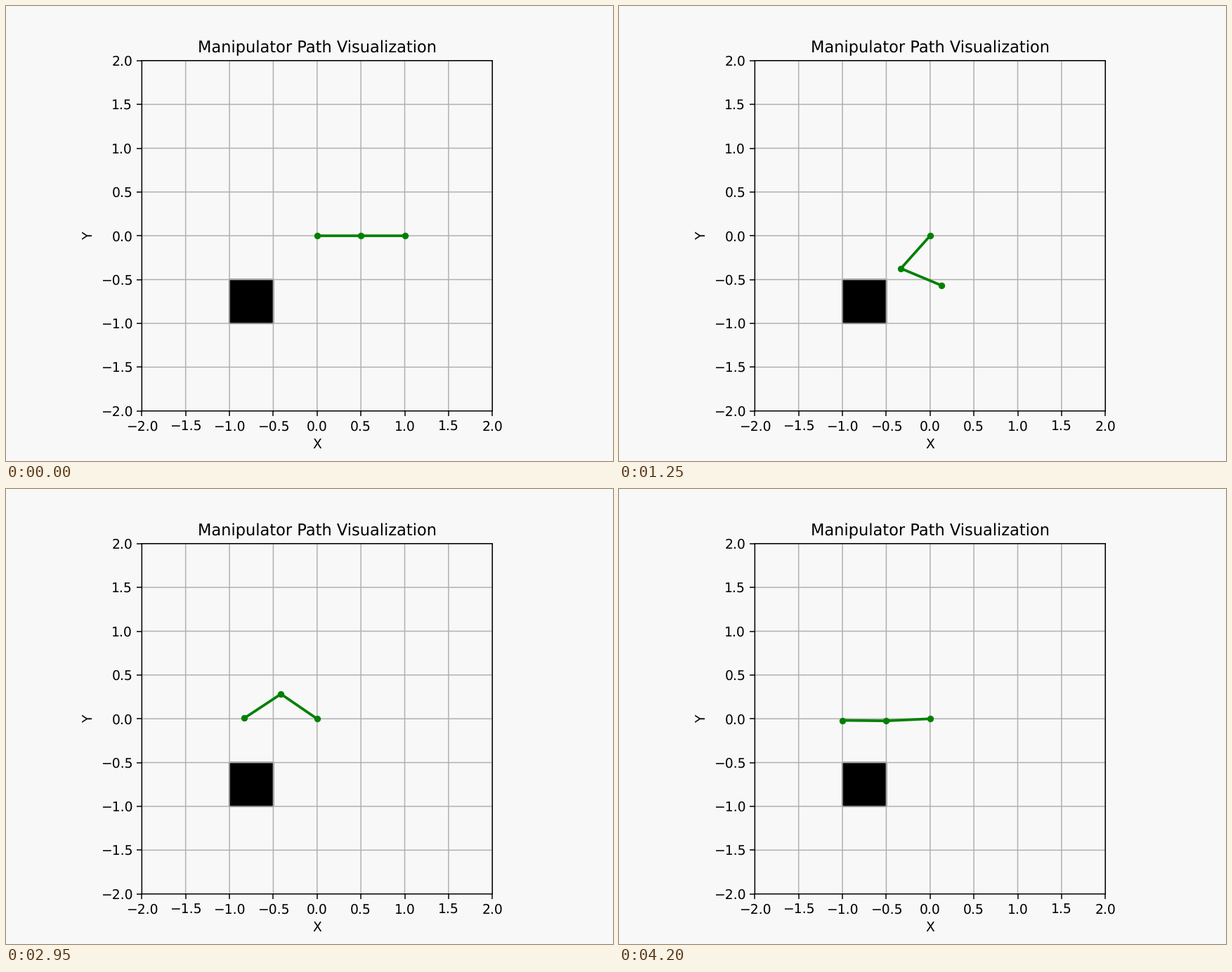
A matplotlib script for the animation above (4250 ms loop, 864 by 648 pixels).

```python
import matplotlib.pyplot as plt
import numpy as np
from matplotlib.animation import FuncAnimation
from matplotlib.patches import Rectangle

FRAMES = 85
LINK = 0.5
BG = "#f8f8f8"

# Turning points of the path: step, shoulder and elbow angle in degrees
KEY_POSES = [
    (0, 0, 0),
    (9, -67.7, 58.5),
    (22, -140, 88.5),
    (25, -131.7, 109),
    (36, -92, 70),
    (46, -135.3, 79.8),
    (55, -215.4, 62),
    (59, -214.4, 67.8),
    (70, -176.4, 48),
    (77, -164.7, 17.3),
    (84, -177.3, -3.3),
]


def joints(step):
    """Return the x and y coordinates of base, elbow and tip."""
    t, shoulder, elbow = zip(*KEY_POSES)
    bends = np.interp(step, t, shoulder), np.interp(step, t, elbow)
    angles = np.radians(np.cumsum(bends))
    x = LINK * np.cumsum([0, *np.cos(angles)])
    y = LINK * np.cumsum([0, *np.sin(angles)])
    return x, y


plt.rcParams["text.hinting"] = "none"
fig, ax = plt.subplots(figsize=(6.4, 4.8), dpi=135, facecolor=BG)
ax.set(xlim=(-2, 2), ylim=(-2, 2), aspect="equal", facecolor=BG,
       xlabel="X", ylabel="Y", title="Manipulator Path Visualization")
ticks = np.linspace(-2, 2, 9)
ax.set_xticks(ticks)
ax.set_yticks(ticks)
ax.grid(True)
ax.add_patch(Rectangle((-1, -1), 0.5, 0.5, color="black"))
arm, = ax.plot([], [], "o-", color="green", lw=2, markersize=4)

# Keep lines at their true sub-pixel positions
for artist in fig.findobj():
    artist.set_snap(False)


def update(step):
    arm.set_data(*joints(step))
    return arm,


anim = FuncAnimation(fig, update, frames=FRAMES, interval=50,
                     repeat=True, repeat_delay=0)
plt.show()
```
